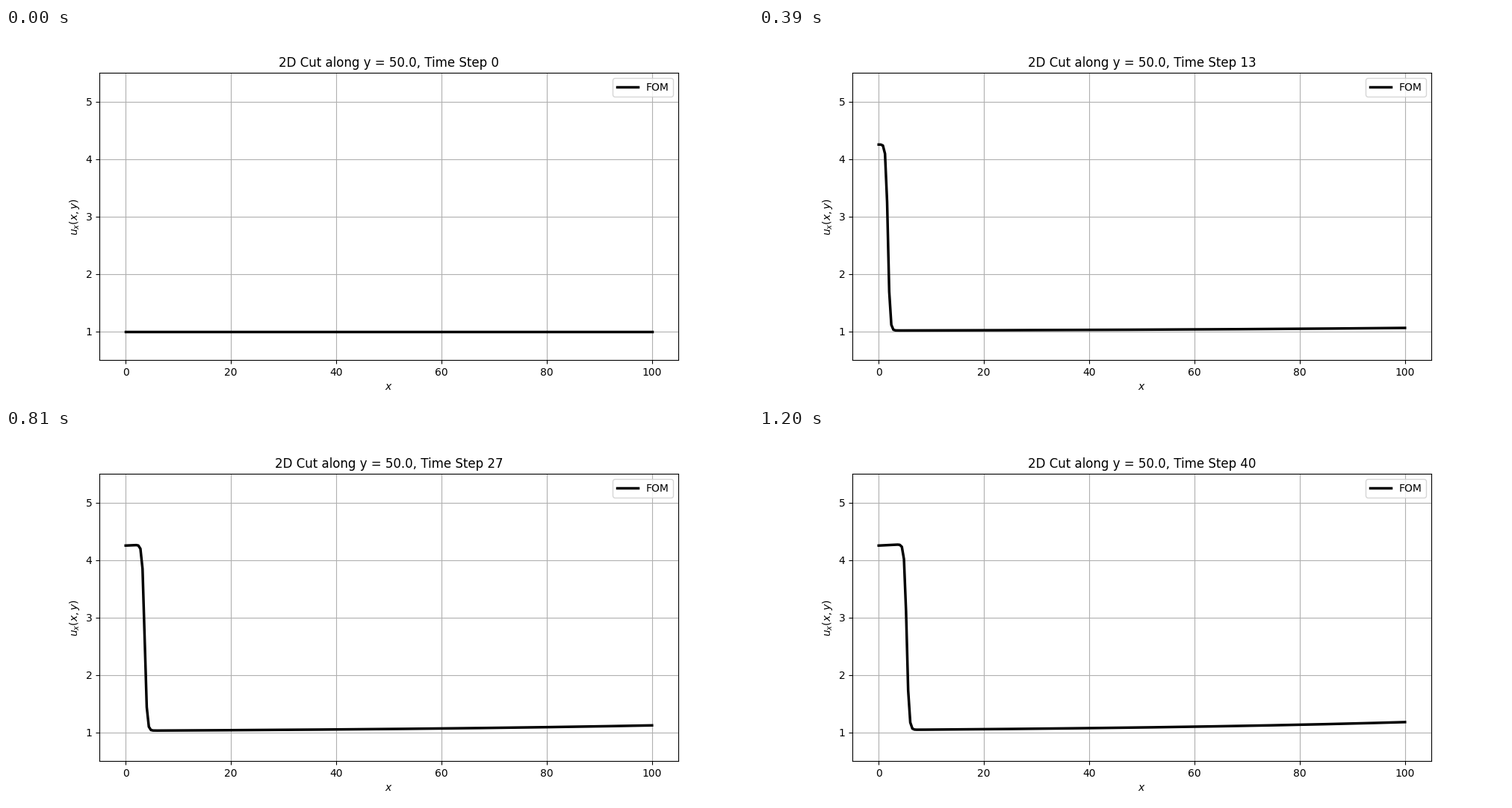
A matplotlib script that plays this animation: 1000 by 500 pixels, repeating every 1.23 s.

```python
import numpy as np
import matplotlib.pyplot as plt
from matplotlib.animation import FuncAnimation

STEPS = 41
INTERVAL = 30          # ms per time step
DT = 0.05
INLET = 4.25           # inflow velocity
SOURCE, RATE = 0.02, 0.015   # source term SOURCE * exp(RATE * x)

x = np.linspace(0, 100, 251)


def velocity(step):
    """Burgers shock travelling right from the inlet, sampled on the mesh."""
    if step == 0:
        return np.ones_like(x)
    t = step * DT
    gain = SOURCE / RATE
    behind = np.sqrt(INLET**2 + 2 * gain * (np.exp(RATE * x) - 1))
    ahead = 1 + gain * (np.exp(RATE * x) - np.exp(RATE * (x - t)))
    front = 0.04 + (INLET + 1) / 2 * t + 0.0075 * t**2
    width = 0.43 - 0.2 * np.exp(-t / 0.5)
    blend = (1 - np.tanh((x - front) / width)) / 2
    u = ahead + (behind - ahead) * blend
    u[0] = INLET
    return u


fig, ax = plt.subplots(figsize=(10, 5), dpi=100)
line, = ax.plot(x, velocity(0), color="black", linewidth=2.5, label="FOM")
ax.set_xlim(-5, 105)
ax.set_ylim(0.5, 5.5)
ax.set_yticks(range(1, 6))
ax.set_xlabel("$x$")
ax.set_ylabel("$u_x(x,y)$")
ax.grid(True)
ax.legend(loc="upper right")
title = ax.set_title("")


def update(step):
    line.set_ydata(velocity(step))
    title.set_text(f"2D Cut along y = 50.0, Time Step {step}")
    return line, title


anim = FuncAnimation(fig, update, frames=STEPS, interval=INTERVAL,
                     repeat=True, repeat_delay=0, blit=False)
plt.show()
```
